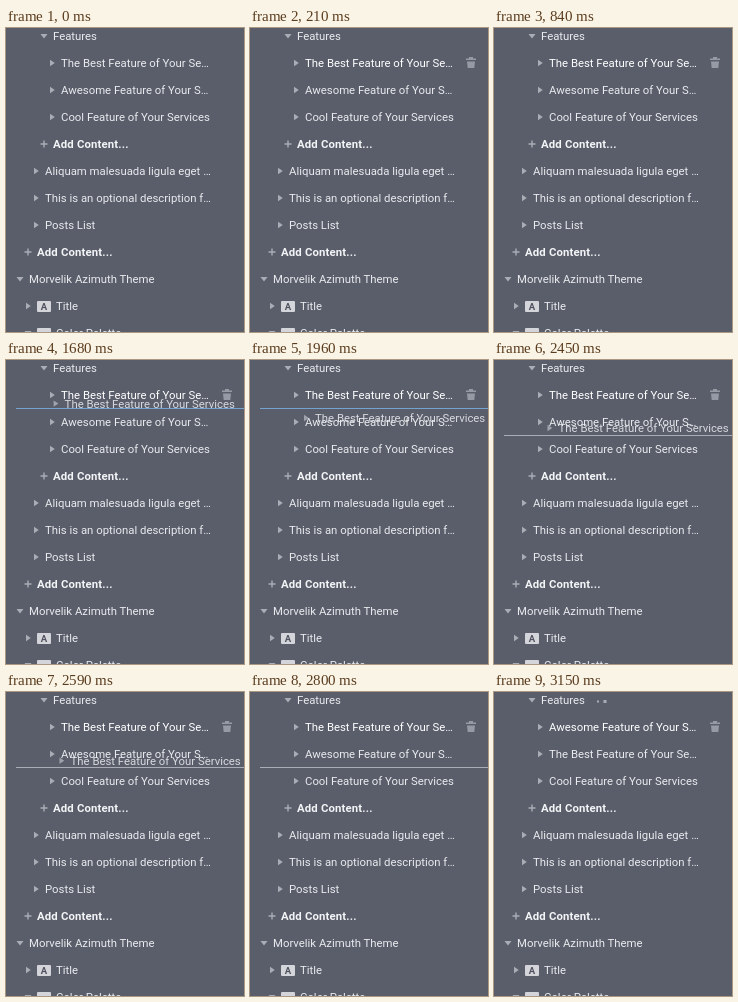
Recreate the animation shown at these times as an HTML page. Size 238 by 304 pixels, loop 3.22 s.

```html
<!DOCTYPE html>
<html lang="en">
<head>
<meta charset="utf-8">
<title>Reordering a content tree</title>
<style>
html, body { margin: 0; height: 100%; overflow: hidden; background: #5a5e6b; }
svg { display: block; width: 238px; height: 304px; }
text { font: 11.37px Roboto, sans-serif; fill: #e9ebee; }
.bold { font-weight: 600; letter-spacing: .15px; fill: #f3f4f6; }
.mark { fill: #a9adb6; }
.icon { fill: #d3d5da; }
.icon + text { font-size: 9.5px; font-weight: 700; fill: #4b4f5b; }
</style>
</head>
<body>
<svg id="stage" viewBox="0 0 238 304"></svg>
<script>
const LOOP = 3220, STEP = 70;
const stage = document.getElementById('stage');

function add(tag, attrs, parent = stage, text = '') {
  const el = document.createElementNS('http://www.w3.org/2000/svg', tag);
  for (const k in attrs) el.setAttribute(k, attrs[k]);
  el.textContent = text;
  return parent.appendChild(el);
}

// Marker shapes, relative to the start of a label
const marks = {
  down: 'M-12.5 -2h7l-3.5 4.5z',
  right: 'M-11 -3.2l4.8 3.2l-4.8 3.2z',
  plus: 'M-12.5 -.7h2.8v-2.8h1.4v2.8h2.8v1.4h-2.8v2.8h-1.4v-2.8h-2.8z'
};

function row(x, y, kind, label, icon) {
  const g = add('g', { transform: `translate(${x} ${y})` });
  add('path', { d: marks[kind], class: 'mark' }, g);
  if (icon) {
    add('rect', { x: 0, y: -5, width: 14, height: 11, rx: 1, class: 'icon' }, g);
    add('text', { x: 7, y: 4, 'text-anchor': 'middle' }, g, icon);
  }
  g.label = add('text', { x: icon ? 19 : 0, y: 4, class: kind === 'plus' ? 'bold' : '' }, g, label);
  return g;
}

const best = 'The Best Feature of Your Se…';
const awesome = 'Awesome Feature of Your S…';

row(47, 8, 'down', 'Features');
const first = row(55, 35, 'right', best);
const second = row(55, 62, 'right', awesome);
row(55, 89, 'right', 'Cool Feature of Your Services');
row(47, 116, 'plus', 'Add Content...');
row(39, 143, 'right', 'Aliquam malesuada ligula eget …');
row(39, 170, 'right', 'This is an optional description f…');
row(39, 197, 'right', 'Posts List');
row(31, 224, 'plus', 'Add Content...');
row(23, 251, 'down', 'Morvelik Azimuth Theme');
row(31, 278, 'right', 'Title', 'A');
row(31, 305, 'down', 'Color Palette', ' ');

const trash = add('path', {
  d: 'M216 30.5h3v-1.5h4v1.5h3v1.5h-10zM217 33.5h8l-.7 6.5h-6.6z',
  fill: '#959aa5'
});
const line = add('rect', { x: 10, width: 228, height: 1 });
const ghost = row(55, 40, 'right', 'The Best Feature of Your Services');
ghost.setAttribute('opacity', .88);
const dots = [104, 111].map(x => ({ x, el: add('rect', { class: 'mark' }) }));

// Piecewise linear path through [time, value] points
function along(points, t) {
  let [t0, v0] = points[0];
  for (const [t1, v1] of points) {
    if (t < t1) return t <= t0 ? v0 : v0 + (v1 - v0) * (t - t0) / (t1 - t0);
    [t0, v0] = [t1, v1];
  }
  return v0;
}

const dragX = [[1610, 57], [1960, 65], [2240, 65.3], [2450, 64.5]];
const dragY = [[1610, 40], [1960, 58], [2100, 62], [2240, 65], [2450, 68], [2660, 69]];

const show = (el, on) => el.setAttribute('visibility', on ? 'visible' : 'hidden');

function draw(now) {
  const t = Math.floor(now % LOOP / STEP) * STEP;

  const hover = Math.min(1, t / 210);
  trash.setAttribute('opacity', hover);
  first.label.style.fill = hover > .5 ? '#fff' : '';

  const moved = t >= 2870;
  first.label.textContent = moved ? awesome : best;
  second.label.textContent = moved ? best : awesome;

  show(ghost, t >= 1610 && t < 2730);
  ghost.setAttribute('transform', `translate(${along(dragX, t)} ${along(dragY, t)})`);

  const lower = t >= 2100;
  show(line, t >= 1680 && !moved);
  line.setAttribute('y', lower ? 75 : 48);
  line.setAttribute('fill', lower ? '#a9adb6' : '#74a3cf');

  const beat = (t - 2940) / STEP;
  dots.forEach(({ x, el }, i) => {
    const size = beat < 0 ? 0 : Math.max(0, 3 - Math.abs(beat - 2 - i));
    el.setAttribute('x', x - size / 2);
    el.setAttribute('y', 9.5 - size / 2);
    el.setAttribute('width', size);
    el.setAttribute('height', size);
  });
}

function frame() {
  draw(performance.now());
  requestAnimationFrame(frame);
}
frame();
</script>
</body>
</html>
```
